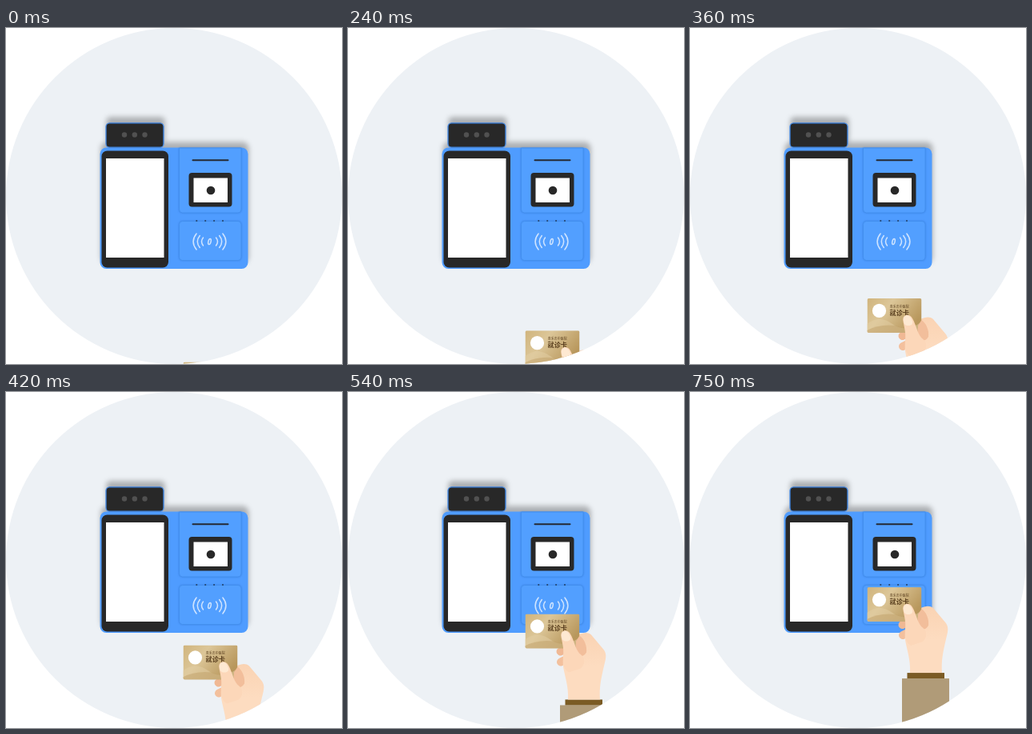
These frames come from a looping animation (420x420 px, 1.8 s). An HTML page:

```html
<!DOCTYPE html>
<html lang="zh-CN">
<head>
<meta charset="utf-8">
<style>
html, body { margin: 0; width: 100%; height: 100%; overflow: hidden; background: #fff; }
svg { display: block; width: 100vw; height: 100vh; }
text { font-family: "Noto Sans CJK SC", "Noto Sans CJK", sans-serif; fill: #5b4020; }
.shade { filter: drop-shadow(1px -7px 3px rgba(0, 0, 0, .27)); }
.panel { fill: #529fff; stroke: #438fee; filter: drop-shadow(0 0 1px rgba(30, 90, 180, .35)); }
</style>
</head>
<body>
<svg viewBox="0 0 420 420">
  <defs>
    <clipPath id="disc"><circle cx="210" cy="210" r="210"/></clipPath>
    <clipPath id="cardShape"><rect x="221.5" width="68" height="43" rx="2"/></clipPath>
    <linearGradient id="gold" x2="1" y2=".5">
      <stop stop-color="#d0b47c"/>
      <stop offset=".4" stop-color="#dcc698"/>
      <stop offset="1" stop-color="#b8975c"/>
    </linearGradient>
    <linearGradient id="skin" x2="0" y2="1">
      <stop stop-color="#fad3b3"/>
      <stop offset=".5" stop-color="#fddcc0"/>
    </linearGradient>
  </defs>

  <circle cx="210" cy="210" r="210" fill="#edf1f5"/>

  <!-- Terminal -->
  <rect class="shade" x="117.5" y="149.5" width="185" height="151.5" rx="8" fill="#4f9cff"/>
  <rect class="shade" x="125" y="118.8" width="72" height="30.4" rx="4.5" fill="#282828" stroke="#3f87e6" stroke-width="1.3"/>
  <g fill="#515151">
    <circle cx="148" cy="133.5" r="3.2"/>
    <circle cx="160.8" cy="133.5" r="3.2"/>
    <circle cx="173.5" cy="133.5" r="3.2"/>
  </g>
  <rect x="119.5" y="153.5" width="83.5" height="146" rx="7" fill="#282828"/>
  <rect x="125" y="163" width="72.5" height="124" fill="#fff"/>

  <path class="panel" d="M216.5 150H294V227Q294 231 290 231H220.5Q216.5 231 216.5 227Z"/>
  <rect class="panel" x="216.5" y="241.5" width="77.5" height="49" rx="4"/>
  <path d="M233.5 165.3H277.5" stroke="#252a33" stroke-width="2" stroke-linecap="round"/>
  <rect x="228.5" y="181" width="54" height="42.5" rx="4" fill="#282828"/>
  <rect x="234.5" y="187.5" width="42.5" height="30.5" fill="#fff"/>
  <circle cx="256" cy="203" r="5.3" fill="#282828"/>
  <path d="M238.3 241H272" stroke="#24456f" stroke-width="2.2" stroke-linecap="round" stroke-dasharray="0 10.9"/>
  <g id="waves" fill="none" stroke="#cfe4ff" stroke-width="1.5" stroke-linecap="round">
    <ellipse cx="254.5" cy="267" rx="1.6" ry="3.6" transform="rotate(14 254.5 267)"/>
  </g>

  <!-- Hand with card, y measured from the card's top edge -->
  <g clip-path="url(#disc)">
    <g id="hand">
      <rect x="265" y="114" width="59" height="80" fill="#b09b78"/>
      <rect x="271.5" y="107" width="46.5" height="7" fill="#7b5b24"/>
      <g stroke="#f0b894" stroke-width="10" stroke-linecap="round">
        <path d="M265.5 47L276 42"/>
        <path d="M266 60L278 54" stroke="#f3c09d"/>
      </g>
      <path fill="url(#skin)" d="M284 28C290 25 298 21 304 26L320 45C324 51 322 57 320 65C316 82 314 92 315 107H275C276 91 271 78 269 66C268 56 270 48 276 43Z"/>
      <g clip-path="url(#cardShape)">
        <rect x="221.5" width="68" height="43" fill="url(#gold)"/>
        <path d="M221 32Q237 20 253 32T290 29V43H221Z" fill="#e3cfa5" opacity=".5"/>
        <path d="M221 40Q246 26 290 42V44H221Z" fill="#c4a56d" opacity=".55"/>
        <circle cx="236.5" cy="15.5" r="8.6" fill="#fff"/>
        <text x="249.8" y="11.6" font-size="4">青禾市中医院</text>
        <text x="249.6" y="20.8" font-size="8.1" font-weight="700">就诊卡</text>
      </g>
      <path d="M285 34L289.5 27C295 31 299 39 298 48C294 55 288 53 284 48Z" fill="#f2be9b"/>
      <path fill="#fcd7b9" d="M266.5 29C264.5 20 274 18 278 25C283 34 284 43 289 49C296 54 298 61 291 68L276 73C270 70 268 61 269 52C270 43 268 37 266.5 29Z"/>
      <path fill="#fee9d2" d="M267 28C266 20 274 19 277 26C280 32 277 34 273 34C269 34 267.5 32 267 28Z"/>
    </g>
  </g>
</svg>
<script>
const LOOP = 1800, STEP = 30, LAST = 750, EASE = 760;
const START = 417.5, TRAVEL = 173.5;
const hand = document.getElementById("hand");
const waves = document.getElementById("waves");

// Three arcs on each side of the contactless symbol
for (const side of [-1, 1]) {
  for (let i = 0; i < 3; i++) {
    const x = 254.5 + side * (8 + i * 4.2), h = 5 + i * 2.5;
    const arc = document.createElementNS("http://www.w3.org/2000/svg", "path");
    arc.setAttribute("d", `M${x} ${267 - h}q${side * h * 0.8} ${h} 0 ${2 * h}`);
    waves.append(arc);
  }
}

function draw(now) {
  const t = Math.min(Math.floor((now % LOOP) / STEP) * STEP, LAST);
  const eased = (1 - Math.cos(Math.PI * t / EASE)) / 2;
  hand.setAttribute("transform", `translate(0 ${START - TRAVEL * eased})`);
  requestAnimationFrame(draw);
}
draw(performance.now());
</script>
</body>
</html>
```
